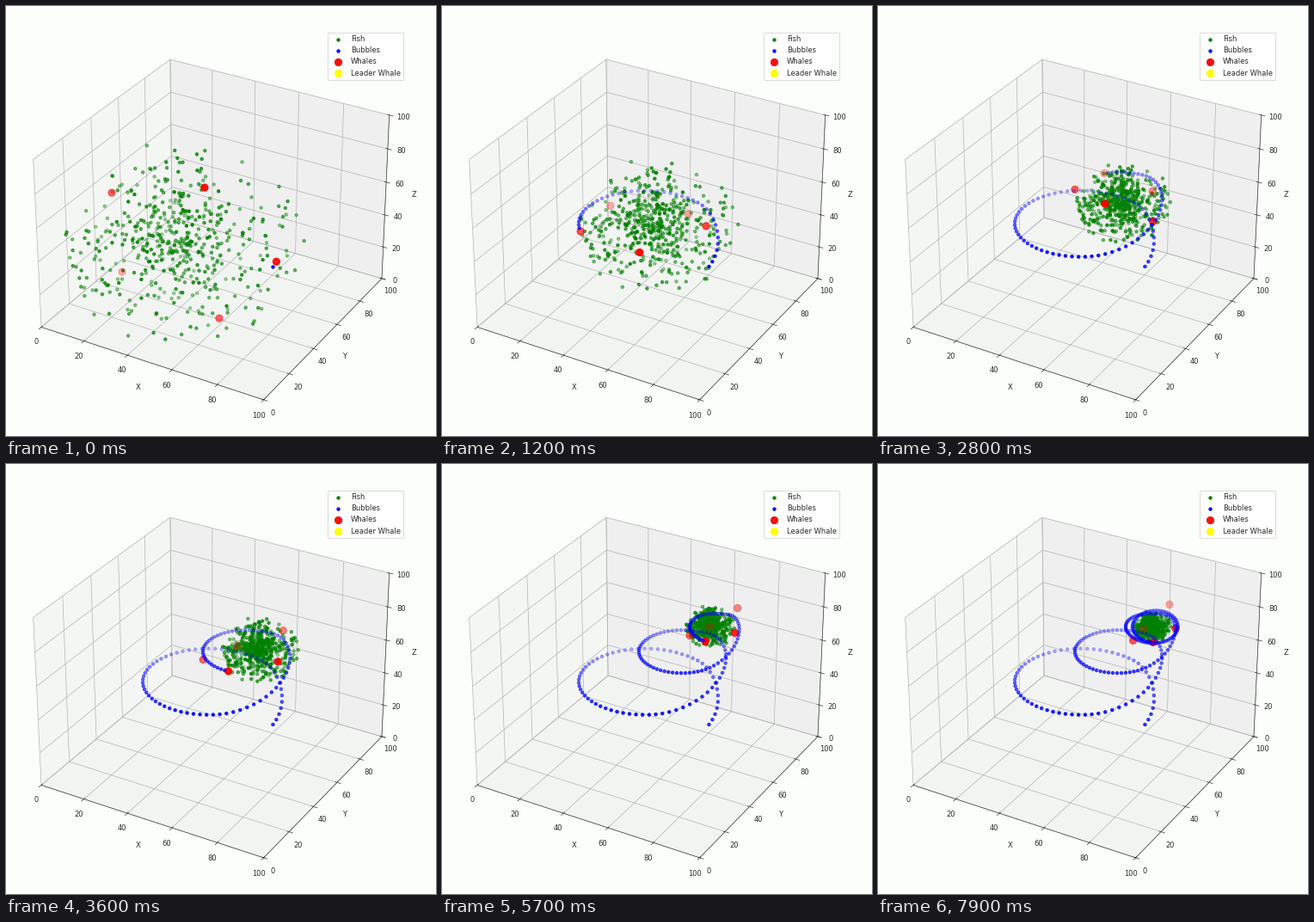
A matplotlib script that plays this animation: 500 by 500 pixels, repeating every 8000 ms.

```python
import numpy as np
import matplotlib.pyplot as plt
from matplotlib.animation import FuncAnimation

FRAMES = 80
BG = "#fcfefb"
INK = "#2b2b2b"
GREEN, BLUE, RED = (0, 0.5, 0, 0.95), (0, 0, 1, 0.92), (1, 0, 0, 0.95)
SMALL, LARGE = 18, 100

plt.rcParams.update({"text.color": INK, "axes.labelcolor": INK,
                     "xtick.color": INK, "ytick.color": INK})
fig = plt.figure(figsize=(500 / 60, 500 / 60), dpi=60, facecolor=BG)
ax = fig.add_axes([0.0126, 0.0262, 0.9206, 0.9206], projection="3d",
                  computed_zorder=False, facecolor=BG)
ax.set(xlim=(0, 100), ylim=(0, 100), zlim=(0, 100),
       xlabel="X", ylabel="Y", zlabel="Z")
for axis, pane in zip((ax.xaxis, ax.yaxis, ax.zaxis), ("#f4f6f4", "#eeefee", "#f2f4f2")):
    axis.set_pane_color(pane)
    axis.line.set_color("#404040")

for label, color, size in [("Fish", GREEN, SMALL), ("Bubbles", BLUE, SMALL),
                           ("Whales", RED, LARGE), ("Leader Whale", "yellow", LARGE)]:
    ax.scatter([], [], [], s=size, color=color, depthshade=False, label=label)
ax.legend(loc="upper right")

# Camera axes for elev=30, azim=-60: right, up, towards the viewer
RIGHT = np.array([0.866, 0.5, 0])
UP = np.array([-0.25, 0.433, 0.866])
NEAR = np.array([0.433, -0.75, 0.5])
PX = 2.962  # pixels per data unit at the box centre


def place(sx, sy, depth):
    """Data coordinates of a point seen at pixel (sx, sy), depth in pixels."""
    d = np.asarray(depth) / PX
    persp = (1 - d * 0.00119) / PX
    a = (sx - 242.7) * persp
    b = (250.4 - sy) * persp
    p = np.multiply.outer(RIGHT, a) + np.multiply.outer(UP, b) + np.multiply.outer(NEAR, d)
    return 50 + p[0], 50 + p[1], 50 + p[2] / 0.75


def ease(x, start, end):
    t = np.clip((x - start) / (end - start), 0, 1)
    return t * t * (3 - 2 * t)


def spiral(k, turn=0.0):
    """Screen position and depth at step k; each turn is higher and tighter."""
    k = np.asarray(k, float)
    cx, cy, r = 236, 283, 86
    for start, end, dx, dy, dr in [(-2, 12, 0, -30, -9), (54, 78, 43, -35, -27),
                                   (120, 142, 39, -29, -20), (180, 215, 4, 0, -4)]:
        move = ease(k, start, end)
        cx, cy = cx + dx * move, cy + dy * move
        r = r + dr * ease(k, start + 4, end + 4)
    phi = 0.1 * k - np.pi / 6 + turn
    squash = 0.5 + 0.2 * ease(k, 140, 200)
    return np.array([cx + r * np.cos(phi), cy - squash * r * np.sin(phi),
                     -0.866 * r * np.sin(phi) - 0.1 * k])


# Followers: starting points (screen x, y, depth) and how far each swims lower
STARTS = [(231, 211, 35), (123, 217, -5), (135, 309, -40), (248, 363, -5)]
SAG = [-5, -12, 18, 12]

rng = np.random.default_rng(7)
N_FISH = 500
ball = rng.normal(size=(3, N_FISH))
ball *= rng.random(N_FISH) ** 0.65 / np.linalg.norm(ball, axis=0)

live = []


def show(points, color, size, zorder):
    live.append(ax.scatter(*place(*points), s=size, color=color, zorder=zorder))


def shoal(n):
    decay = np.exp(-n / 25)
    spread = 16 + 134 * decay
    x, y, d = ball * spread
    jx, jy = np.random.default_rng(100 + n).normal(0, 1, (2, N_FISH))
    return (324 - 117 * decay + x + jx,
            max(189, 276 - 1.65 * n) + 0.82 * y + jy,
            d - 0.3 * n)


def pod(n, k):
    whales = [spiral(k)]
    joined = ease(n, 0, 12)
    for i, (start, sag) in enumerate(zip(STARTS, SAG), 1):
        slot = spiral(k, i * 2 * np.pi / 5) + [0, sag, 0]
        whales.append(np.array(start) * (1 - joined) + slot * joined)
    return np.transpose(whales)


def draw(n):
    while live:
        live.pop().remove()
    k = 3 * n + (3 if n else 1)
    show(shoal(n), GREEN, SMALL, 1)
    show(pod(n, k), RED, LARGE, 2)
    show(spiral(np.arange(k)), BLUE, SMALL, 3)
    return live


anim = FuncAnimation(fig, draw, frames=FRAMES, interval=100, repeat=True,
                     repeat_delay=0, blit=False)
plt.show()
```
